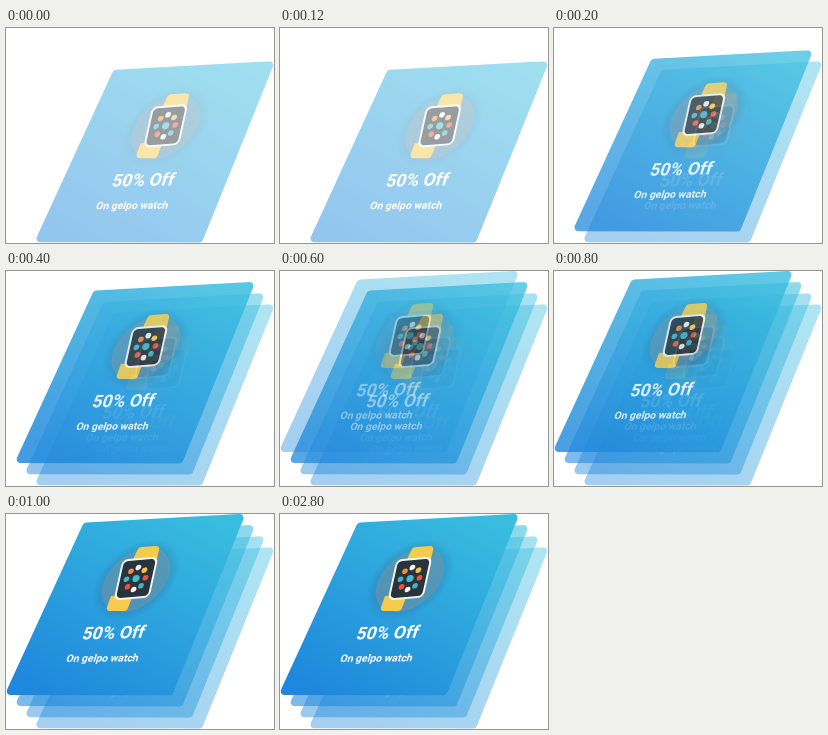
Animation, 268 px wide and 215 px high, one loop 4000 ms. Source, as an HTML page:

```html
<!DOCTYPE html>
<html lang="en">
<head>
<meta charset="utf-8">
<title>Stacked offer cards</title>
<style>
  html, body { margin: 0; width: 100%; height: 100%; overflow: hidden; background: #fff; }
  svg { display: block; width: 268px; height: 215px; }
  text { font-family: Roboto, "Open Sans", sans-serif; font-weight: 700; fill: #fff; }
</style>
</head>
<body>
<svg viewBox="0 0 268 215">
  <defs>
    <linearGradient id="paint" x1=".9" y1="0" x2=".15" y2="1">
      <stop offset="0" stop-color="#38bddf"/>
      <stop offset="1" stop-color="#1f88dc"/>
    </linearGradient>
    <radialGradient id="shade">
      <stop offset=".7" stop-color="#2b5f86" stop-opacity=".3"/>
      <stop offset="1" stop-color="#2b5f86" stop-opacity="0"/>
    </radialGradient>
    <g id="card">
      <polygon points="80.4,12.5 233.5,4 163.5,177.3 4.8,177" fill="url(#paint)"
        stroke="url(#paint)" stroke-width="8" stroke-linejoin="round"/>
      <g transform="matrix(1 -.03 -.4 1 130 66)">
        <circle r="41" fill="url(#shade)"/>
        <circle r="32" fill="#8b98a2" opacity=".42"/>
      </g>
      <g fill="#f4cb4c">
        <path d="M128 43 L132 35 Q133 33 136 33 L150 32 Q154 32 153 36 L151 45 L127 48Z"/>
        <path d="M105 82 L101 93 Q100 97 104 97 L118 97 Q121 97 122 94 L127 81Z"/>
      </g>
      <g transform="matrix(1 -.08 -.22 1 130 64.5)">
        <rect x="-18" y="-20.5" width="36" height="41" rx="6" fill="#f4f6f6"/>
        <rect x="-16" y="-18.5" width="32" height="37" rx="4.5" fill="#29333b"/>
        <g id="apps"></g>
      </g>
      <text transform="matrix(1 -.025 -.32 1 75 125.5)" font-size="17.5">50% Off</text>
      <text transform="matrix(1 -.01 -.3 1 59.5 148)" font-size="10.4">On gelpo watch</text>
    </g>
  </defs>
  <g id="stack"></g>
</svg>
<script>
const LOOP = 4000, STEP = 200;

// Opacity of each card at each step, back to front.
const fades = [
  [.48, .4, .4, .4, .4, .4],
  [0, .74, .5, .45, .45, .45],
  [0, 0, .84, .75, .58, .58],
  [0, 0, 0, .4, .8, 1]
];

const byId = id => document.getElementById(id);

function add(parent, tag, attrs) {
  const el = document.createElementNS('http://www.w3.org/2000/svg', tag);
  for (const key in attrs) el.setAttribute(key, attrs[key]);
  return parent.appendChild(el);
}

function stepOpacity(el, values) {
  const frames = values.map((opacity, i) => ({ opacity, offset: i * STEP / LOOP, easing: 'step-end' }));
  frames.push({ opacity: values[values.length - 1], offset: 1 });
  el.animate(frames, { duration: LOOP, iterations: Infinity });
}

const tints = ['#f4f4ee', '#f2c14b', '#e8553f', '#3fb5c4', '#f4f4ee', '#e8553f', '#3fb5c4', '#f08a3c'];
add(byId('apps'), 'circle', { r: 3.6, fill: '#43bccb' });
tints.forEach((fill, i) => {
  const turn = i * Math.PI / 4;
  add(byId('apps'), 'circle', { cx: 9.5 * Math.sin(turn), cy: -11 * Math.cos(turn), r: 2.8, fill });
});

fades.forEach((values, i) => {
  const depth = fades.length - 1 - i;
  const card = add(byId('stack'), 'use', {
    href: '#card',
    transform: `translate(${9.9 * depth} ${11.1 * depth})`
  });
  stepOpacity(card, values);
});
</script>
</body>
</html>
```
